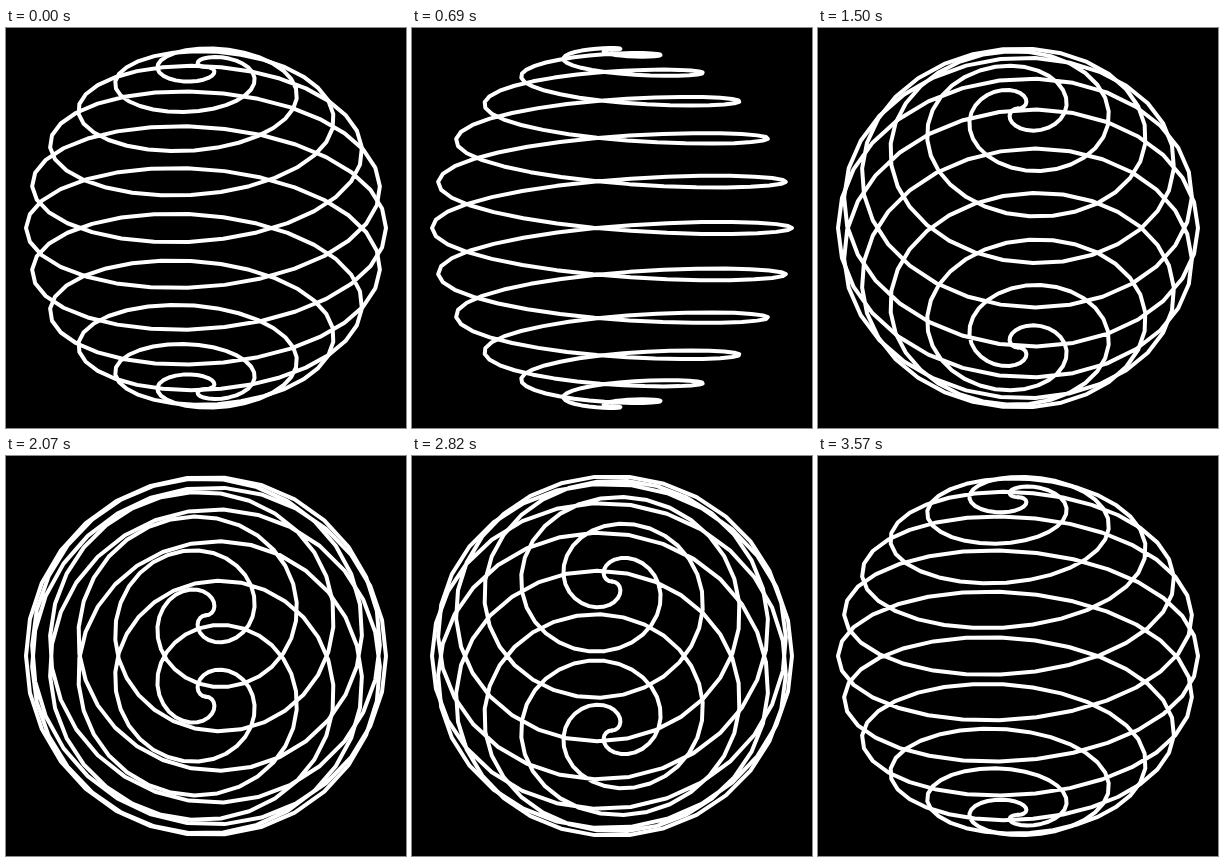
These frames come from a looping animation (400 by 400 pixels, 3.6 s). An HTML page with a canvas:

```html
<!DOCTYPE html>
<html>
<head>
<meta charset="utf-8">
<style>
  html, body { margin: 0; height: 100%; overflow: hidden; background: #000; }
  canvas { display: block; }
</style>
</head>
<body>
<canvas id="stage" width="400" height="400"></canvas>
<script>
const ctx = document.getElementById('stage').getContext('2d');
const RADIUS = 180, TURNS = 12, LOOP = 3600, STEP = 30;
const RAD = Math.PI / 180;

// One spiral from pole to pole; side = -1 gives its twin, half a turn around the axis.
function spiral(side, tilt) {
  ctx.beginPath();
  for (let deg = 0; deg <= 180; deg++) {
    const polar = deg * RAD, around = TURNS * polar;
    const ring = side * RADIUS * Math.sin(polar);
    const x = ring * Math.cos(around);
    const y = RADIUS * Math.cos(polar) * Math.cos(tilt) + ring * Math.sin(around) * Math.sin(tilt);
    ctx.lineTo(200 + x, 200 - y);
  }
  ctx.stroke();
}

function draw(now) {
  const time = Math.floor(now % LOOP / STEP) * STEP;
  const tilt = Math.PI * time / LOOP - Math.atan(0.5);
  ctx.fillStyle = '#000';
  ctx.fillRect(0, 0, 400, 400);
  ctx.strokeStyle = '#fff';
  ctx.lineWidth = 4;
  ctx.lineJoin = ctx.lineCap = 'round';
  spiral(1, tilt);
  spiral(-1, tilt);
}

function tick() {
  draw(performance.now());
  requestAnimationFrame(tick);
}
tick();
</script>
</body>
</html>
```
